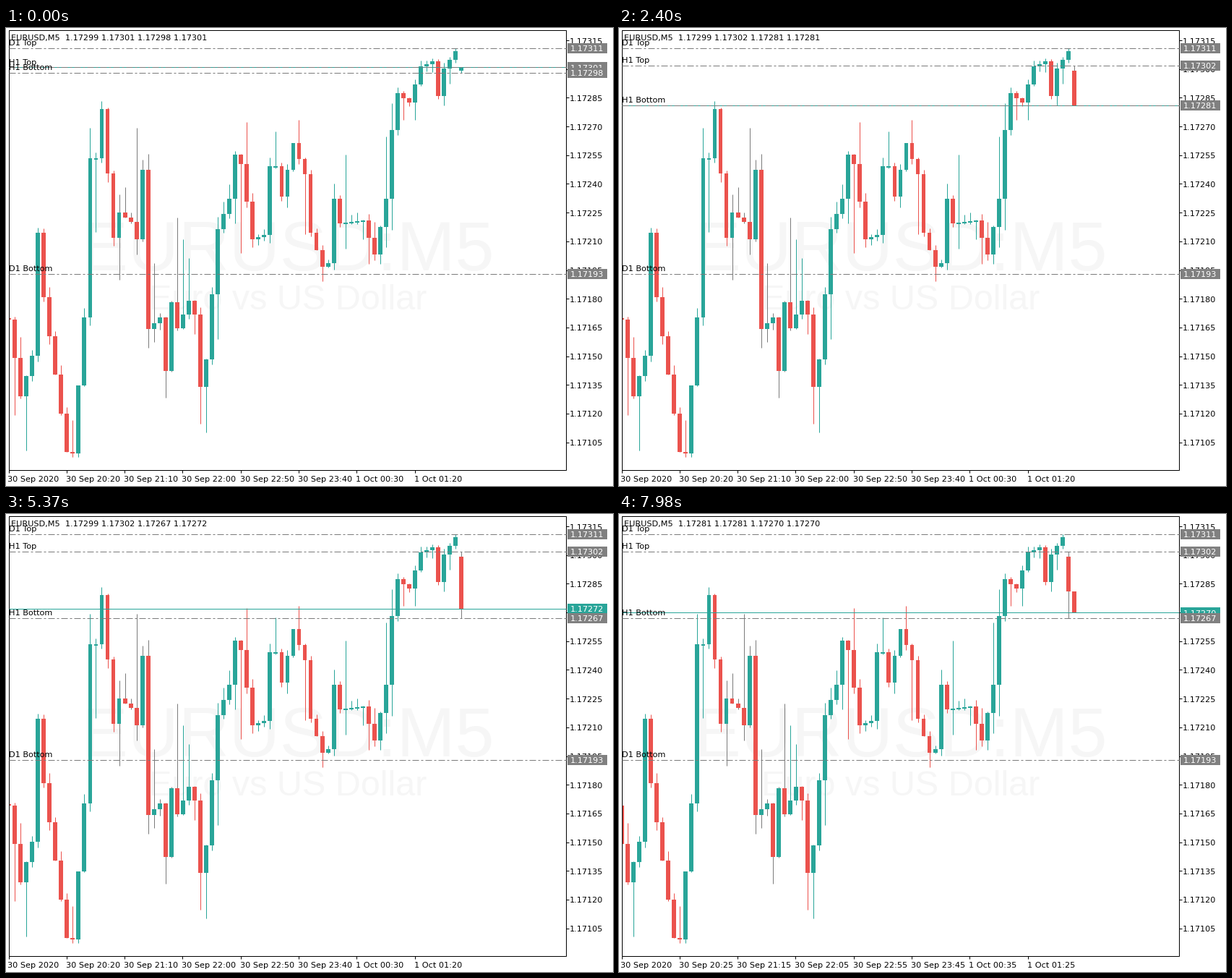
Write a matplotlib script that moves like this. It is 840 px wide and 633 px high and loops after 8 s.

```python
import numpy as np
import matplotlib.pyplot as plt
from matplotlib.animation import FuncAnimation
from matplotlib.collections import LineCollection, PolyCollection
from matplotlib.patches import Rectangle

W, H, DPI = 840, 633, 64
PX = 72 / DPI                     # one pixel in points
FRAMES, INTERVAL, TICK = 250, 32, 30
LEFT, TOP, RIGHT, BOTTOM = 4, 3, 775, 610.5
TEAL, RED, GRAY = "#29a599", "#eb524d", "#7b7b7b"
STEP, BARS = 8.03, 78             # candle spacing, closed candles at the start
NEW_BAR = 7080                    # ms

# Swings of the closing price: candle -> height on the chart
SWINGS = {0: 403, 2: 509, 4: 453, 5: 283, 6: 372, 10: 586, 11: 588, 13: 400,
          14: 180, 15: 180, 16: 112, 18: 290, 19: 255, 21: 268, 22: 292,
          23: 196, 24: 416, 26: 400, 27: 474, 28: 379, 29: 415, 31: 377,
          32: 396, 33: 496, 34: 458, 36: 278, 38: 236, 39: 175, 40: 188,
          42: 292, 44: 286, 45: 191, 46: 191, 47: 233, 49: 159, 51: 202,
          52: 283, 54: 330, 55: 325, 56: 236, 57: 270, 61: 266, 63: 313,
          65: 236, 66: 141, 67: 90, 69: 103, 71: 53, 73: 46, 74: 94,
          75: 56, 77: 32}
# Long wicks: candle -> height of the tip
SPIKES = {1: 535, 3: 584, 11: 542, 14: 411, 15: 282, 19: 348, 22: 138, 25: 325,
          27: 511, 29: 262, 30: 292, 33: 540, 34: 559, 36: 430, 40: 311, 41: 130,
          46: 143, 50: 129, 51: 285, 58: 175, 65: 150, 66: 279}
# Live price: ms -> points above 1.17000
LIVE = {0: 301, 300: 302, 1500: 291, 1560: 292, 3120: 272, 3360: 284, 4560: 273,
        5160: 267, 5340: 272, 6800: 281, NEW_BAR: 281, 7940: 270, 8000: 270}


def price_y(p):
    return 27.7 + (311 - p) * 2.645


def history():
    rng = np.random.default_rng(4)
    close = np.interp(np.arange(BARS), list(SWINGS), list(SWINGS.values()))
    start = np.r_[401, close[:-1]]
    high = np.minimum(start, close) - rng.exponential(9, BARS)
    low = np.maximum(start, close) + rng.exponential(9, BARS)
    for k, tip in SPIKES.items():
        high[k], low[k] = min(high[k], tip), max(low[k], tip)
    # stay inside the day's range
    return list(zip(start, np.maximum(high, price_y(311)), np.minimum(low, 593), close))


def price_path():
    """One price per tick: a jittered walk that stays between its key prices."""
    rng = np.random.default_rng(7)
    keys, vals = np.array(list(LIVE)), np.array(list(LIVE.values()))
    t = np.arange(0, 8000, TICK)
    seg = np.searchsorted(keys, t, "right") - 1
    near = np.abs(t[:, None] - keys).min(axis=1) < 2 * TICK
    jitter = rng.choice([-1, 0, 0, 1], t.size) * ~near
    a, b = vals[seg], vals[seg + 1]
    walk = np.rint(np.interp(t, keys, vals)) + jitter
    return np.clip(walk, np.minimum(a, b), np.maximum(a, b)).astype(int)


HISTORY, PATH = history(), price_path()
SPLIT = NEW_BAR // TICK


def bar(ticks, first, low):
    return first, max(first, ticks.max()), min(low, ticks.min()), ticks[-1]


fig = plt.figure(figsize=(W / DPI, H / DPI), dpi=DPI, facecolor="white")
ax = fig.add_axes([0, 0, 1, 1])
ax.set(xlim=(0, W), ylim=(H, 0))
ax.axis("off")


def label(x, y, s="", size=11.3, color="black", z=4, **kw):
    kw.setdefault("family", "DejaVu Sans")
    return ax.text(x, y, s, fontsize=size * PX, color=color, zorder=z,
                   va="baseline", **kw)


def line(x, y, color="black", z=3, **kw):
    return ax.plot(x, y, color=color, lw=PX, zorder=z,
                   solid_capstyle="butt", dash_capstyle="butt", **kw)[0]


def price_text(p):
    return f"1.{17000 + p}"


class Tag:
    """Coloured price box on the scale."""

    def __init__(self, color, z):
        self.box = ax.add_patch(Rectangle((777, 0), 55, 14, fc=color, lw=0, zorder=z))
        self.text = label(780.5, 0, color="white", z=z + 0.1)

    def move(self, p):
        y = price_y(p)
        self.box.set_y(y - 7)
        self.text.set_y(y + 4.4)
        self.text.set_text(price_text(p))


class Level:
    """Dash-dot line with a name and a price box."""

    def __init__(self, name, z):
        self.line = line([LEFT, RIGHT], [0, 0], GRAY, ls=(0, (9, 3, 3, 3)))
        self.name = label(4, 0, name)
        self.tag = Tag("#808080", z)

    def move(self, p):
        y = price_y(p)
        self.line.set_ydata([y, y])
        self.name.set_y(y - 3.6)
        self.tag.move(p)


# Watermark
for y, s, size in [(335, "EURUSD:M5", 97), (389, "Euro vs US Dollar", 48.5)]:
    label(390, y, s, size, "#f6f6f6", 1, family="Liberation Sans", ha="center")

# Frame and scales
ax.add_patch(Rectangle((LEFT - 0.5, TOP - 0.5), RIGHT - LEFT + 0.5, BOTTOM - TOP + 0.5,
                       fill=False, ec="black", lw=PX, zorder=3))
for p in range(105, 316, 15):
    y = price_y(p)
    line([RIGHT, RIGHT + 4], [y, y])
    label(780, y + 4.4, price_text(p))

times = []
for n in range(8):
    x = 3.5 + 80.3 * n
    line([x, x], [BOTTOM, BOTTOM + 4])
    times.append(label(x - 1, 627.2, "30 Sep 2020"))

# Candles
clip = Rectangle((LEFT, TOP), RIGHT - LEFT, BOTTOM - TOP, transform=ax.transData)
wicks = LineCollection([], linewidths=PX, zorder=2, capstyle="butt")
bodies = PolyCollection([], linewidths=0, zorder=2.1)
for c in (wicks, bodies):
    ax.add_collection(c, autolim=False)
    c.set_clip_path(clip)

title = label(7.3, 16.8)
bid = line([LEFT, RIGHT], [0, 0], TEAL)
bid_tag = Tag(TEAL, 5)
day_top, day_low = Level("D1 Top", 6), Level("D1 Bottom", 6)
hour_top, hour_low = Level("H1 Top", 7), Level("H1 Bottom", 8)
day_top.move(311)
day_low.move(193)


def draw_candles(live, shift):
    rows = HISTORY + [tuple(price_y(v) for v in b) for b in live]
    segs, rects, wick_cols, body_cols = [], [], [], []
    for k, (o, h, l, c) in enumerate(rows):
        x = 4 + STEP * (k - shift)
        color = TEAL if c <= o else RED
        gray = 19 <= k < 30 or (k >= BARS and color == RED)
        a, b = min(o, c), max(o, c)
        b = max(b, a + 1.5)
        segs.append([(x, h), (x, l)])
        rects.append([(x - 2.9, a), (x + 2.9, a), (x + 2.9, b), (x - 2.9, b)])
        wick_cols.append(GRAY if gray else color)
        body_cols.append(color)
    wicks.set_segments(segs)
    wicks.set_color(wick_cols)
    bodies.set_verts(rects)
    bodies.set_facecolor(body_cols)


def update(i):
    n = i * INTERVAL // TICK
    shift = int(n >= SPLIT)
    live = [bar(PATH[:min(n + 1, SPLIT)], 299, 298)]
    if shift:
        live.append(bar(PATH[SPLIT:n + 1], 281, 281))
    now = live[-1]
    draw_candles(live, shift)
    title.set_text("EURUSD,M5  " + " ".join(price_text(v) for v in now))

    y = price_y(now[3])
    bid.set_ydata([y, y])
    bid_tag.move(now[3])
    hour_top.move(max(b[1] for b in live))
    hour_low.move(min(b[2] for b in live))

    for j, t in enumerate(times[1:]):
        m = 20 * 60 + 20 + 50 * j + 5 * shift
        day = "30 Sep" if m < 1440 else "1 Oct"
        t.set_text(f"{day} {m // 60 % 24:02d}:{m % 60:02d}")
    return []


anim = FuncAnimation(fig, update, frames=FRAMES, interval=INTERVAL,
                     init_func=lambda: update(0), repeat=True, repeat_delay=0)
plt.show()
```
